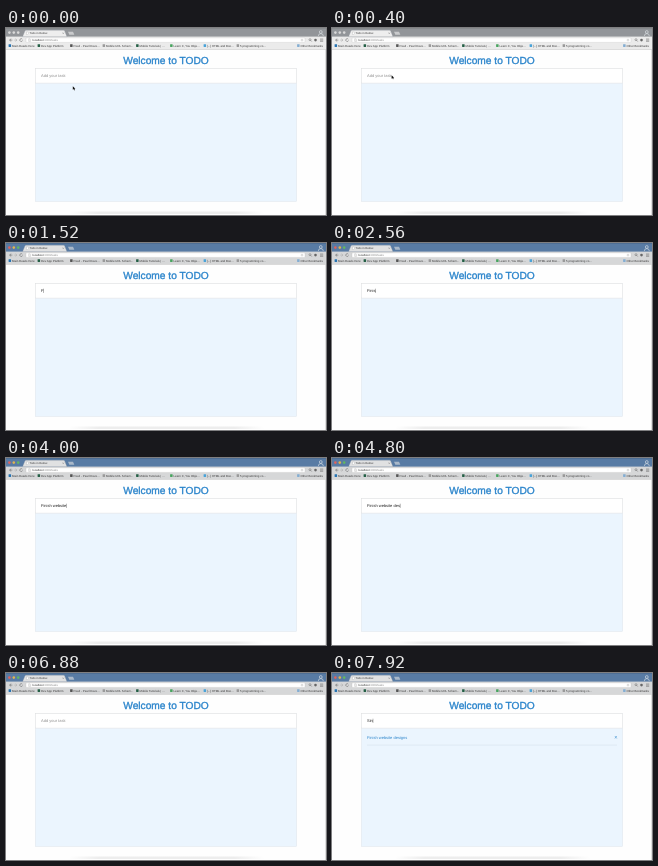
An HTML page that plays this animation: 320 by 187 pixels, repeating every 8000 ms.

```html
<!DOCTYPE html>
<html lang="en">
<head>
<meta charset="utf-8">
<title>Todo list</title>
<style>
html, body { margin: 0; width: 100%; height: 100%; overflow: hidden; background: #fff; }
svg { display: block; width: 100vw; height: 100vh; }
text { font-family: "Liberation Sans", Arial, sans-serif; text-rendering: geometricPrecision; white-space: pre; }
.marks text { font-size: 2.9px; fill: #333; }
.field { font-size: 4px; }
.blue { fill: #2a84cb; }
.title { font-size: 10.2px; text-anchor: middle; stroke: #2a84cb; stroke-width: .34px; }
.idle { --strip: #929599; --edge: #84878b; --bar: #ebebeb; --tab: #eeeeee; --r: #d9d9d9; --y: #d9d9d9; --g: #d9d9d9; }
.live { --strip: #587ba4; --edge: #4c6b90; --bar: #d6d7d8; --tab: #e0e1e2; --r: #e2625c; --y: #dfb451; --g: #62b860; }
</style>
</head>
<body>
<svg id="stage" class="idle" viewBox="0 0 320 187" preserveAspectRatio="none">
  <defs>
    <linearGradient id="dock">
      <stop offset="0" stop-color="#eee" stop-opacity="0"/>
      <stop offset=".15" stop-color="#ededed"/>
      <stop offset=".85" stop-color="#ededed"/>
      <stop offset="1" stop-color="#eee" stop-opacity="0"/>
    </linearGradient>
  </defs>
  <rect width="320" height="187" fill="#fefefe"/>

  <!-- browser window -->
  <rect width="320" height="9" fill="var(--strip)"/>
  <rect width="320" height=".8" fill="var(--edge)"/>
  <rect y="8.6" width="320" height="12.6" fill="var(--bar)"/>
  <rect y="21" width="320" height=".5" fill="#bdbdbd"/>
  <rect x="319.3" y="21" width=".7" height="166" fill="#d2d2d2"/>
  <circle cx="3.4" cy="4.6" r="1.3" fill="var(--r)"/>
  <circle cx="7.8" cy="4.6" r="1.3" fill="var(--y)"/>
  <circle cx="12.2" cy="4.6" r="1.3" fill="var(--g)"/>
  <path d="M16.5 8.8 19 2.8Q19.3 2.2 20 2.2H57.5Q58.3 2.2 58.6 2.8L61 8.8Z" fill="var(--tab)" stroke="#7d8791" stroke-width=".25"/>
  <path d="M62 3.8h5l1.3 3h-5Z" fill="var(--tab)" opacity=".6"/>
  <rect x="20.5" y="4" width="1.8" height="2.5" fill="#fff" stroke="#999" stroke-width=".25"/>
  <text x="23.5" y="6.4" font-size="2.8" fill="#333">Todo in Redux</text>
  <path d="m56.5 4.5 1.5 1.5m0-1.5L56.5 6" stroke="#777" stroke-width=".35"/>
  <g fill="none" stroke="#e3e7eb" stroke-width=".6">
    <circle cx="314.8" cy="4" r="1.4"/>
    <path d="M312.3 8q0-2.4 2.5-2.4t2.5 2.4"/>
  </g>

  <g fill="none" stroke="#6d6d6d" stroke-width=".6">
    <path d="M5.2 10.7 3.6 12.1 5.2 13.5M3.6 12.1H6.4"/>
    <path d="m9.4 10.7 1.6 1.4-1.6 1.4M8.2 12.1H11" stroke="#b0b0b0"/>
    <path d="M16.3 11.2a1.4 1.4 0 1 0 .2 1.3"/>
  </g>
  <rect x="20" y="9.8" width="279" height="4.6" rx=".7" fill="#fff" stroke="#bcbcbc" stroke-width=".3"/>
  <path d="M22.6 10.8h1.5l.5.6v2h-2Z" fill="#eee" stroke="#999" stroke-width=".25"/>
  <text x="26.5" y="13.1" font-size="2.8" fill="#222">localhost<tspan fill="#888">:3000/tasks</tspan></text>
  <circle cx="296" cy="12.1" r=".9" fill="none" stroke="#999" stroke-width=".35"/>
  <circle cx="304" cy="11.7" r="1" fill="none" stroke="#666" stroke-width=".5"/>
  <path d="m304.7 12.4 1.1 1.2" stroke="#666" stroke-width=".5"/>
  <circle cx="309.5" cy="12.1" r="1.3" fill="#666"/>
  <path d="M314 11h3.2m-3.2 1.2h3.2m-3.2 1.2h3.2" stroke="#666" stroke-width=".5"/>
  <g class="marks" id="marks"></g>

  <!-- page -->
  <text class="blue title" x="160" y="35.7">Welcome to TODO</text>
  <rect x="29.4" y="40.4" width="261.2" height="133" fill="#ebf5fe" stroke="#dde4e9" stroke-width=".5"/>
  <rect x="29.4" y="40.4" width="261.2" height="14.7" fill="#fff" stroke="#dfdfdf" stroke-width=".5"/>
  <text class="field" id="entry" x="35" y="49.2"></text>
  <rect id="caret" y="45.7" width=".4" height="4.2" fill="#444"/>
  <g id="item">
    <text class="field blue" x="35" y="65.6">Finish website designs</text>
    <path d="m282.9 63 1.9 2.5m0-2.5-1.9 2.5" stroke="#2a84cb" stroke-width=".5"/>
    <rect x="35" y="71.8" width="250" height=".5" fill="#d0dde7"/>
  </g>
  <rect x="63" y="183.5" width="195" height="2.5" fill="url(#dock)"/>
  <path id="pointer" d="M0 0v3.5l.8-.7.6 1.3.7-.3-.6-1.3h1.1Z" fill="#111" stroke="#fff" stroke-width=".3" paint-order="stroke"/>
</svg>
<script>
const $ = id => document.getElementById(id);
const LOOP = 8000, STEP = 80;
const HINT = "Add your task", TASK = "Finish website designs", NEXT = "Sin";
const taskKeys = [1360, 1920, 2080, 2240, 2560, 2640, 2960, 3120, 3200, 3360,
  3680, 3760, 3920, 4000, 4160, 4480, 4640, 4800, 4960, 5120, 5360, 5520];
const nextKeys = [7760, 7840, 7920];

// label, left edge, icon colour
const marks = [
  ["Main Reads Here", 6, "#2774b3"], ["Dev App Platform", 35, "#245f45"],
  ["Pearl - Pearl Deve...", 67.5, "#555"], ["Mobile URL Schem...", 100, "#9a9a9a"],
  ["Mobile Tutorials | ...", 133.5, "#245f45"], ["Learn C, You Obje...", 167.5, "#48a45f"],
  ["[...] HTML and Boo...", 201, "#4aa3d8"], ["5 programming co...", 234, "#999"],
  ["Other Bookmarks", 294.5, "#83add2"]
];
$("marks").innerHTML = marks.map(([label, x, color]) =>
  `<rect x="${x - 3.4}" y="16.3" width="2.5" height="2.6" rx=".3" fill="${color}"/>
   <text x="${x}" y="18.6">${label}</text>`).join("");

const typed = (text, keys, t) => text.slice(0, keys.filter(k => k <= t).length);
const within = (t, a, b) => t >= a && t < b;
const show = (id, on) => $(id).setAttribute("visibility", on ? "visible" : "hidden");

let last = -1;
function draw(now) {
  const t = Math.floor(now % LOOP / STEP) * STEP;
  if (t !== last) {
    last = t;
    $("stage").setAttribute("class", t < 560 ? "idle" : "live");

    const p = Math.min(t / 480, 1), ease = p * p * (3 - 2 * p);
    $("pointer").setAttribute("transform", `translate(${66.8 - 7.8 * ease} ${58.3 - 12 * ease})`);
    show("pointer", t < 1360);

    const text = t < 6480 ? typed(TASK, taskKeys, t) : typed(NEXT, nextKeys, t);
    const entry = $("entry");
    entry.textContent = text || HINT;
    entry.setAttribute("fill", text ? "#222" : "#8e8e8e");
    $("caret").setAttribute("x", 35 + (text ? entry.getComputedTextLength() : -.3));
    show("caret", within(t, 960, 6080) || within(t, 6480, 6880) || t >= 7680);
    show("item", t >= 7120);
  }
  requestAnimationFrame(draw);
}
requestAnimationFrame(draw);
</script>
</body>
</html>
```
